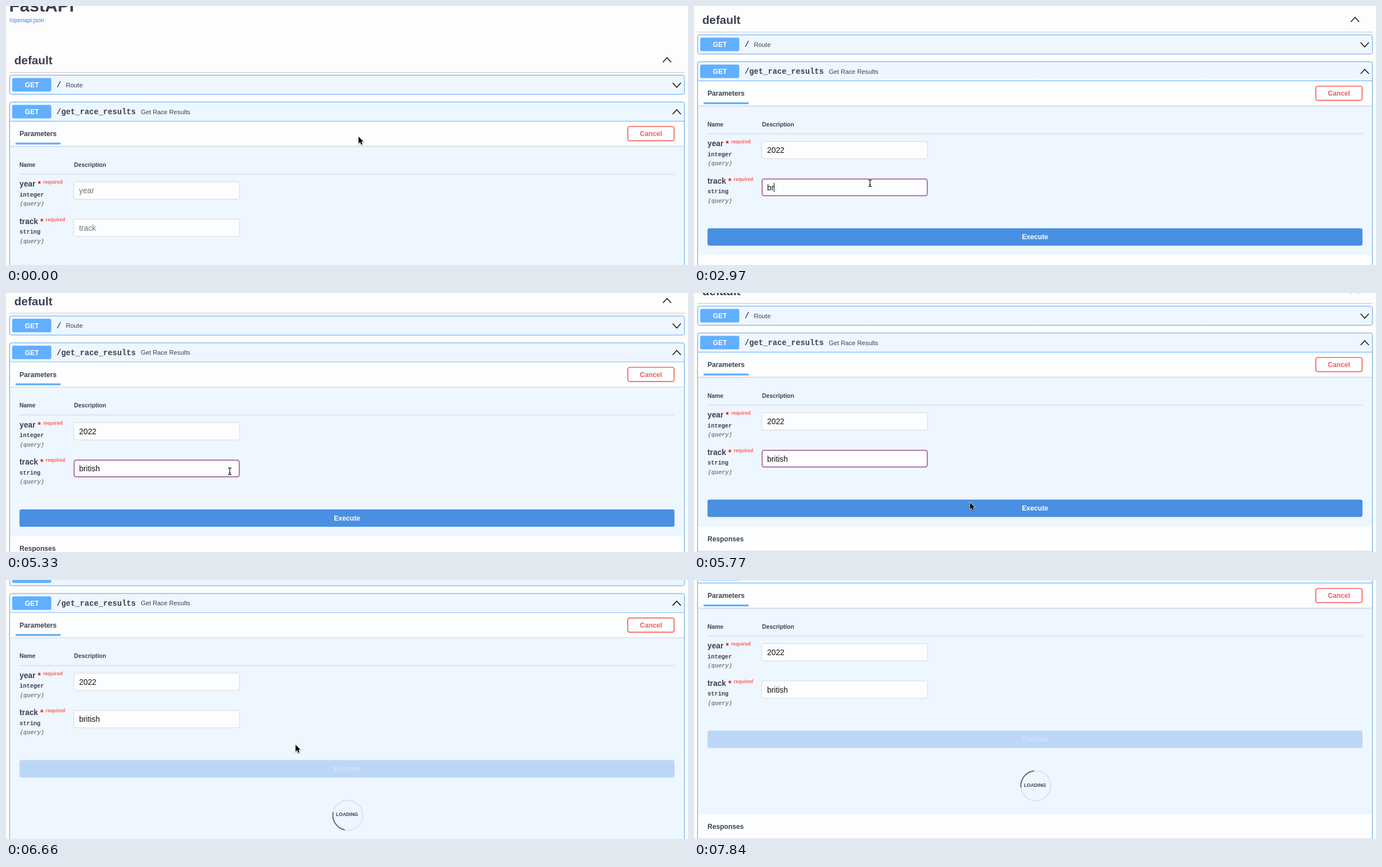
Write an HTML page with a canvas that moves like this. It is 1213 by 462 pixels and loops after 7990 ms.

```html
<!DOCTYPE html>
<html lang="en">
<head>
<meta charset="utf-8">
<title>API docs</title>
<style>
html, body { margin: 0; width: 100%; height: 100%; overflow: hidden; background: #fdfdfd; }
canvas { display: block; }
</style>
</head>
<body>
<canvas id="stage" width="1213" height="462"></canvas>
<script>
const ctx = document.getElementById('stage').getContext('2d');
const LOOP = 7990, STEP = 147.75, LAST = 53;
const SANS = '"Liberation Sans", Arial, sans-serif';
const MONO = '"Liberation Mono", "Courier New", monospace';
const INK = '#3b4151', BLUE = '#61affe', PANEL = '#eef6ff', STRIP = '#fcfeff', RED = '#fa5d5a';
const FIELD = { x: 120.5, w: 295, h: 31, year: 313.5, track: 380 };

// Keyframes: [tick, value...]
const SCROLL = [[1, 0], [5, 72], [33, 72], [36, 82.5], [39, 100], [42, 100], [47, 173], [49, 173], [53, 200]];
const MOUSE = [[1, 627, 233], [5, 373, 258], [12, 373, 258], [15, 313, 316], [33, 313, 316],
  [36, 398, 318], [40, 508, 384], [42, 515, 294]];
const YEAR = [[9, '2'], [10, '20'], [11, '202'], [12, '2022']];
const TRACK = [[20, 'br'], [21, 'bri'], [23, 'briti'], [25, 'brit'], [26, 'bri'], [27, 'brit'],
  [28, 'briti'], [30, 'britis'], [31, 'british']];
const FOCUS = [[6, 'year'], [16, 'track'], [41, '']];
const CLICK_MS = 6000, MOUSE_GONE = 52;

const clamp = v => Math.max(0, Math.min(1, v));

function tween(keys, tick) {
  const next = keys.findIndex(k => k[0] > tick);
  if (next === 0) return keys[0].slice(1);
  if (next < 0) return keys[keys.length - 1].slice(1);
  const a = keys[next - 1], b = keys[next];
  const p = (tick - a[0]) / (b[0] - a[0]), e = p * p * (3 - 2 * p);
  return a.slice(1).map((v, i) => v + (b[i + 1] - v) * e);
}

function latest(keys, tick) {
  return keys.reduce((value, k) => k[0] <= tick ? k[1] : value, '');
}

function text(str, x, y, size, { style = 'bold', color = INK, font = SANS, align = 'left' } = {}) {
  ctx.font = `${style} ${size}px ${font}`;
  ctx.fillStyle = color;
  ctx.textAlign = align;
  ctx.fillText(str, x, y);
}

function box(x, y, w, h, r, fill, stroke, width = 1) {
  ctx.beginPath();
  ctx.roundRect(x, y, w, h, r);
  if (fill) { ctx.fillStyle = fill; ctx.fill(); }
  if (stroke) { ctx.strokeStyle = stroke; ctx.lineWidth = width; ctx.stroke(); }
}

function line(points, color, width) {
  ctx.beginPath();
  points.forEach(([x, y]) => ctx.lineTo(x, y));
  ctx.strokeStyle = color;
  ctx.lineWidth = width;
  ctx.stroke();
}

function shadowed(blur, dy, alpha, draw) {
  ctx.save();
  ctx.shadowColor = `rgba(0,0,0,${alpha})`;
  ctx.shadowBlur = blur;
  ctx.shadowOffsetY = dy;
  draw();
  ctx.restore();
}

function chevron(x, y, dir) {
  line([[x - 7.3, y + 4 * dir], [x, y - 4 * dir], [x + 7.3, y + 4 * dir]], '#1c1c1c', 1.7);
}

function operation(y, h, path, summary, summaryX, dir) {
  shadowed(3, 0, 0.19, () => box(6.5, y, 1200, h, 3.5, PANEL));
  box(6.5, y, 1200, h, 3.5, PANEL, BLUE);
  box(11, y + 5, 69.5, 24, 3, BLUE);
  text('GET', 46, y + 21.5, 12.1, { color: '#fff', align: 'center' });
  text(path, 90, y + 21.5, 13.8, { font: MONO });
  text(summary, summaryX, y + 21, 11.22, { style: 'normal' });
  chevron(1193, y + 17.5, dir);
}

function strip(y, h, label) {
  shadowed(2, 1, 0.14, () => {
    ctx.fillStyle = STRIP;
    ctx.fillRect(7, y, 1199, h);
  });
  text(label, 24, y + 26.2, 12.1);
}

function parameter(y, name, type, starX) {
  text(name, 24, y + 8.5, 13.8);
  text('*', starX, y + 8.5, 13.8, { color: '#f00' });
  text('required', starX + 9.8, y + 3.7, 8.63, { color: '#f9625f' });
  text(type, 24, y + 26, 10.36, { font: MONO });
  text('(query)', 24.5, y + 42.5, 10.36, { font: MONO, style: 'italic bold', color: '#808080' });
}

function field(name, value, focused, caret) {
  const y = FIELD[name];
  if (focused) box(FIELD.x + 0.7, y + 0.7, FIELD.w - 1.4, FIELD.h - 1.4, 3.5, '#fcfdff', '#a3609c', 1.7);
  else box(FIELD.x, y, FIELD.w, FIELD.h, 3.5, '#fcfdfe', '#d9d9d9');
  text(value || name, 130, y + 20.5, 13.85, { style: 'normal', color: value ? '#111' : '#757575' });
  if (focused && caret) {
    const x = 130 + (value ? ctx.measureText(value).width : 0);
    ctx.fillStyle = '#000';
    ctx.fillRect(Math.round(x), y + 7.5, 1, 16);
  }
}

function executeButton(alpha) {
  ctx.save();
  ctx.globalAlpha = alpha;
  box(24, 468.5, 1165, 31, 3.5, '#4990e2');
  text('Execute', 606.5, 488, 12.1, { color: '#fff', align: 'center' });
  ctx.restore();
}

function loader(ms) {
  const turn = ms * 0.365 * Math.PI / 180 - Math.PI / 2;
  ctx.save();
  ctx.globalAlpha = clamp(0.3 + ms / 300);
  ctx.lineWidth = 1.8;
  ctx.strokeStyle = 'rgba(85,85,85,.12)';
  ctx.beginPath();
  ctx.arc(608, 567, 26.7, 0, 7);
  ctx.stroke();
  ctx.strokeStyle = '#5d6068';
  ctx.beginPath();
  ctx.arc(608, 567, 26.7, turn - Math.PI / 4, turn + Math.PI / 4);
  ctx.stroke();
  text('LOADING', 606.5, 568.8, 8.55, { align: 'center' });
  ctx.restore();
}

function arrow(x, y) {
  ctx.save();
  ctx.translate(x, y);
  const shape = new Path2D('M0 0V12L2.8 9.6L4.8 14.2L6.9 13.3L4.9 8.8H8.7Z');
  ctx.lineJoin = 'round';
  ctx.lineWidth = 1.6;
  ctx.strokeStyle = '#fff';
  shadowed(2, 1, 0.4, () => ctx.stroke(shape));
  ctx.fillStyle = '#000';
  ctx.fill(shape);
  ctx.restore();
}

function beam(x, y) {
  ctx.save();
  ctx.translate(x, y);
  const shape = new Path2D('M-3-6.2Q0-6.2 0-4Q0-6.2 3-6.2M0-4.5V4.5M-3 6.2Q0 6.2 0 4Q0 6.2 3 6.2M-1.5 2.7H1.5');
  for (const [color, width] of [['#fff', 2.6], ['#111', 1.2]]) {
    ctx.strokeStyle = color;
    ctx.lineWidth = width;
    ctx.stroke(shape);
  }
  ctx.restore();
}

function overField(x, y) {
  return x > FIELD.x && x < FIELD.x + FIELD.w &&
    [FIELD.year, FIELD.track].some(top => y > top && y < top + FIELD.h);
}

function page(tick, sinceClick) {
  const loading = sinceClick > 0;
  const focus = latest(FOCUS, tick);
  const caret = tick < 34;

  text('FastAPI', 5.5, 9.5, 31.07);
  text('/openapi.json', 6, 28.8, 10.4, { style: 'normal', color: '#3f86dd' });
  text('default', 14.7, 104, 20.72);
  chevron(1175.7, 96.3, 1);
  line([[6, 118.5], [1207, 118.5]], 'rgba(59,65,81,.3)', 1);

  operation(123.5, 34, '/', 'Route', 106.5, -1);
  operation(171.5, 700, '/get_race_results', 'Get Race Results', 239.7, 1);
  line([[7, 205.5], [1206, 205.5]], BLUE, 1);

  strip(206, 43.5, 'Parameters');
  ctx.fillStyle = BLUE;
  ctx.fillRect(17, 243.7, 80, 3.4);
  box(1105.9, 215, 82.4, 25.4, 3.5, STRIP, RED, 1.7);
  text('Cancel', 1147, 232.2, 12.1, { color: RED, align: 'center' });

  text('Name', 24, 286.7, 10.36);
  text('Description', 121, 286.7, 10.36);
  line([[24, 300], [1189, 300]], 'rgba(59,65,81,.2)', 1);
  parameter(313.5, 'year', 'integer', 56.4);
  parameter(380, 'track', 'string', 61);
  field('year', latest(YEAR, tick), focus === 'year', caret);
  field('track', latest(TRACK, tick), focus === 'track', caret);

  const fade = clamp(sinceClick / 300);
  executeButton(1 - 0.7 * fade * (2 - fade));
  if (loading) loader(sinceClick);
  strip(loading ? 617.5 : 516.5, 43.5, 'Responses');
}

function render(ms) {
  const tick = Math.min(LAST, Math.floor(ms / STEP));
  const [scroll] = tween(SCROLL, tick);
  const [x, y] = tween(MOUSE, tick);

  ctx.fillStyle = '#fdfdfd';
  ctx.fillRect(0, 0, 1213, 462);
  ctx.save();
  ctx.translate(0, -scroll);
  page(tick, tick * STEP - CLICK_MS);
  ctx.restore();

  if (tick < MOUSE_GONE) (overField(x, y + scroll) ? beam : arrow)(x, y);
}

const start = performance.now();
function loop() {
  render((performance.now() - start) % LOOP);
  requestAnimationFrame(loop);
}
loop();
</script>
</body>
</html>
```
